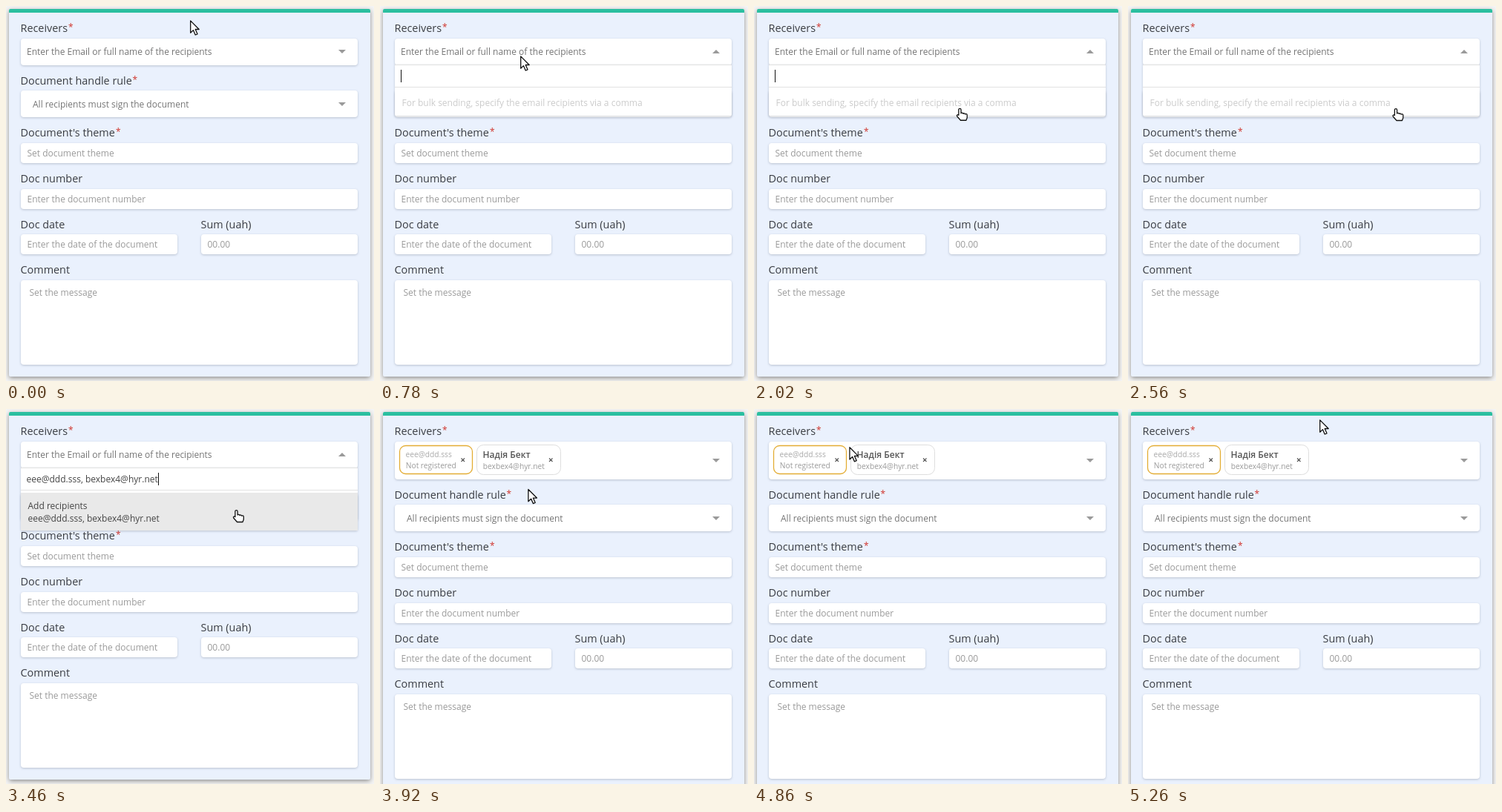
These frames come from a looping animation (496x506 px, 5.58 s). An HTML page:

```html
<!DOCTYPE html>
<html lang="en">
<head>
<meta charset="utf-8">
<title>Document form</title>
<style>
html, body { margin: 0; width: 100%; height: 100%; overflow: hidden; background: #f4f4f4; }
svg { display: block; font: 12px "Open Sans", "Noto Sans", sans-serif; fill: #9a9a9a; }
.panel { fill: #eaf1fd; filter: drop-shadow(0 2px 3px rgba(0,0,0,.42)); }
.field { fill: #fff; filter: drop-shadow(0 1px 1.5px rgba(40,50,70,.25)); }
.label { font-size: 14.4px; fill: #3a3d42; }
.star { fill: #d0342c; }
.value { fill: #757575; }
.dark { fill: #444; }
.hint { fill: #cbcbcb; }
.small { font-size: 10.2px; }
.name { font-weight: 600; fill: #555; }
.line { stroke: #e2e2e2; }
.close { stroke: #555; stroke-width: 1.1; }
.mouse { fill: #fff; stroke: #111; stroke-width: 1.3; stroke-linejoin: round; }
</style>
</head>
<body>
<svg width="496" height="506">
  <rect id="panel" class="panel" x="4" y="4" width="487" rx="2"/>
  <path d="M4 9V6q0-2 2-2H489q2 0 2 2V9Z" fill="#2bbfa0"/>
  <g id="top"></g>
  <g id="rest"></g>

  <g id="empty">
    <rect class="field" x="20" y="44" width="454" height="36" rx="4"/>
    <text class="value" x="28" y="66">Enter the Email or full name of the recipients</text>
    <path id="down" d="M448 59h10l-5 5z"/>
  </g>

  <g id="list">
    <rect id="sheet" class="field" x="20" y="79" width="454" rx="2"/>
    <path class="line" d="M20 79.5H474M20 109.5H474"/>
    <path id="up" d="M448 64h10l-5-5z"/>
    <text id="hint" class="hint" x="29.500" y="135">For bulk sending, specify the email recipients via a comma</text>
    <g id="found" class="dark">
      <rect x="20" y="113" width="454" height="51" fill="#e9e9e9"/>
      <text id="typed" x="27.500" y="99"></text>
      <text x="29.500" y="135">Add recipients</text>
      <text id="option" x="29.500" y="152"></text>
    </g>
    <rect id="caret" y="86" width="1" height="17" fill="#111"/>
  </g>

  <g id="chips">
    <rect class="field" x="20" y="44" width="454" height="51" rx="4"/>
    <path d="M448 67h10l-5 5z"/>
    <rect x="26.500" y="49.500" width="98" height="38" rx="8" fill="#fff" stroke="#e3ad35" stroke-width="1.3"/>
    <text id="mailA" class="small" x="34.500" y="65" fill="#aaa"></text>
    <text class="small" x="34.800" y="80">Not registered</text>
    <rect x="130.500" y="48.500" width="113" height="40" rx="9" fill="#fff" stroke="#dedede"/>
    <text class="name" x="138.500" y="66">Надія Бект</text>
    <text id="mailB" class="small" x="138.800" y="81"></text>
    <path class="close" d="M109.500 66.500l4.500 4.500m0-4.500l-4.500 4.500M228 66.500l4.500 4.500m0-4.500l-4.500 4.500"/>
  </g>

  <g id="mouse" class="mouse">
    <path id="arrow" d="M.7.9V17.200L4.400 13.600 7.200 20 10 18.800 7.200 12.500H12.200Z"/>
    <path id="hand" d="M-1.600 9.500V2.200C-1.600.2 1.600.2 1.600 2.200V7C2.200 6 4 6.300 4.400 7.500 5 6.600 6.800 7 7.100 8.200 8 7.400 9.800 7.800 9.800 9.500V13L8.500 16.500H1L-3.800 11C-4.700 9.400-3 8.400-1.600 9.500Z"/>
  </g>
</svg>
<script>
const $ = id => document.getElementById(id);
const show = (id, on) => $(id).style.display = on ? "" : "none";

const LOOP = 5580, OPEN = 620, PASTE = 3020, PICK = 3580;
const mailA = "eee@ddd.sss", mailB = "bexbex4@hyr.net";

const text = (cls, x, y, s) => `<text class="${cls}" x="${x}" y="${y}">${s}</text>`;
const label = (x, y, s, star) =>
  text("label", x, y, s) + (star ? text("star", star, y - 2, "*") : "");
const field = (x, y, w, h, s, dx = 8.5, base = 18, cls = "") =>
  `<rect class="field" x="${x}" y="${y}" width="${w}" height="${h}" rx="4"/>` +
  text(cls, x + dx, y + base, s);

$("top").innerHTML = label(19.5, 35, "Receivers", 84);
$("rest").innerHTML =
  label(19.5, 106, "Document handle rule", 170.5) +
  field(20, 114, 454, 36, "All recipients must sign the document", 16, 23, "value") +
  '<path d="M448 130h10l-5 5z"/>' +
  label(19.5, 176, "Document's theme", 148) +
  field(20, 185, 454, 27, "Set document theme") +
  label(19.5, 238, "Doc number") +
  field(20, 247, 454, 27, "Enter the document number") +
  label(19.5, 300, "Doc date") +
  field(20, 308, 211, 27, "Enter the date of the document") +
  label(262.5, 300, "Sum (uah)") +
  field(263, 308, 211, 27, "00.00") +
  label(19.5, 361, "Comment") +
  field(20, 370, 454, 114, "Set the message", 11.5, 21);

$("mailA").textContent = mailA;
$("mailB").textContent = mailB;
$("typed").textContent = $("option").textContent = mailA + ", " + mailB;

// Pointer path: time, x, y
const path = [
  [0, 248, 19], [60, 248, 19], [600, 194, 62], [780, 189, 67], [920, 131, 66],
  [1060, 131, 66], [1280, 29, 137], [1560, 124.5, 137], [2160, 324, 138],
  [2400, 361, 138], [3020, 361, 138], [3440, 310.5, 136], [3580, 310.5, 136],
  [4440, 29, 64], [4500, 26.5, 63], [4700, 75, 66], [5250, 258, 14], [LOOP, 258, 14]
];

function pointer(t) {
  const i = path.findIndex(p => p[0] > t);
  const [t0, x0, y0] = path[i - 1], [t1, x1, y1] = path[i];
  const k = (t - t0) / (t1 - t0);
  return [x0 + (x1 - x0) * k, y0 + (y1 - y0) * k];
}

function draw(now) {
  const t = now % LOOP;
  const open = t >= OPEN && t < PICK, pasted = t >= PASTE, picked = t >= PICK;
  const shift = picked ? 15 : 0;

  $("panel").setAttribute("height", 496 + shift);
  $("rest").setAttribute("transform", `translate(0 ${shift})`);
  show("empty", !picked);
  show("down", !open);
  show("list", open);
  show("chips", picked);

  show("hint", !pasted);
  show("found", pasted);
  $("sheet").setAttribute("height", pasted ? 85 : 69);
  $("caret").setAttribute("x", pasted ? 205 : 28);
  show("caret", (t - (pasted ? PASTE : OPEN + 20)) % 1000 < 500);

  const [x, y] = pointer(t), hand = open && y > 112;
  $("mouse").setAttribute("transform", `translate(${x} ${y})`);
  show("hand", hand);
  show("arrow", !hand);
}

let start;
function tick(now) {
  start ??= now;
  draw(now - start);
  requestAnimationFrame(tick);
}
draw(0);
requestAnimationFrame(tick);
</script>
</body>
</html>
```
